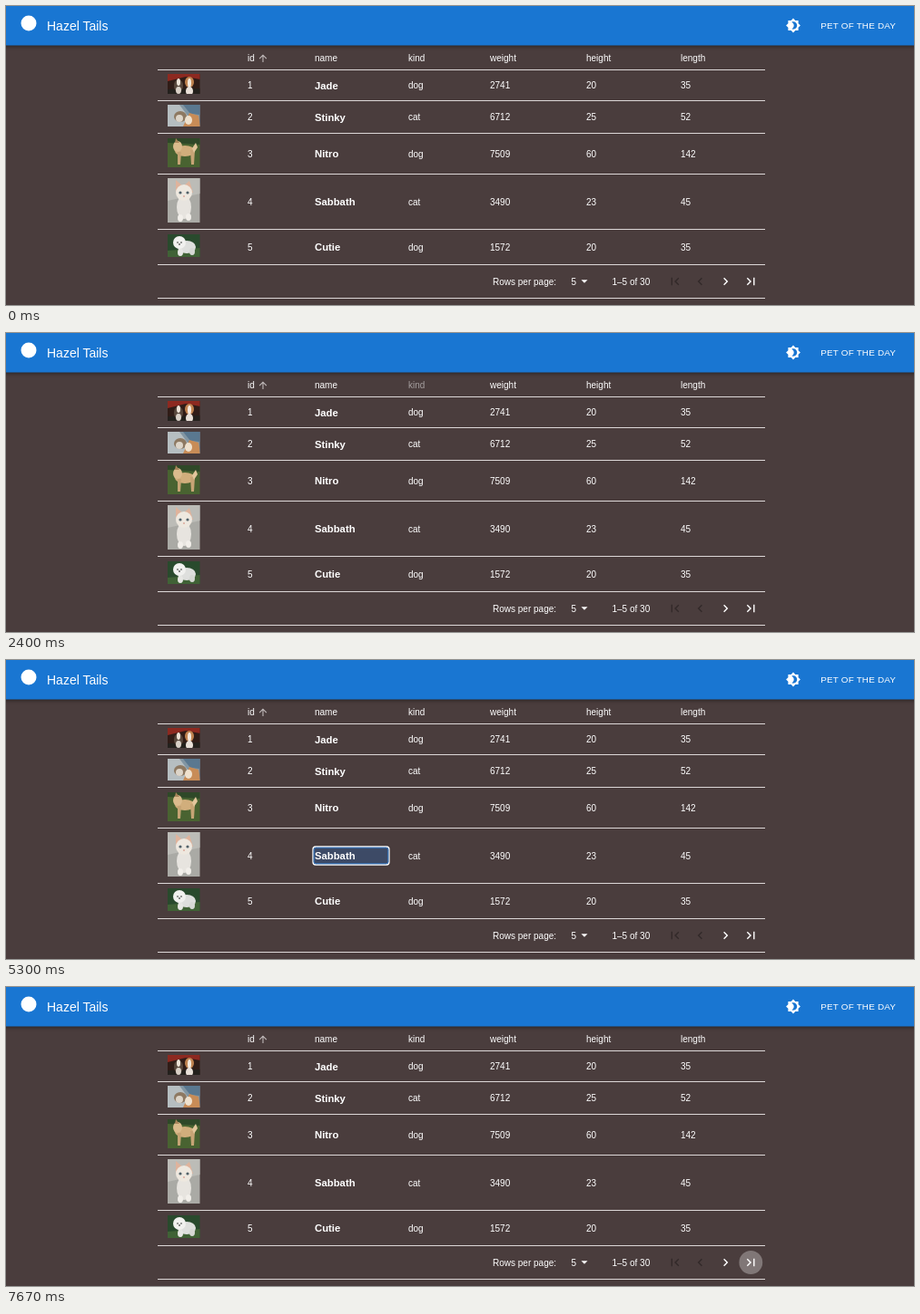
Write an HTML page that moves like this. It is 1000 by 330 pixels and loops after 7.83 s.

```html
<!DOCTYPE html>
<html lang="en">
<head>
<meta charset="utf-8">
<title>Pet table</title>
<style>
  html, body { margin: 0; width: 100%; height: 100%; overflow: hidden; background: #4a3d3d; }
  svg { display: block; }
  text { font: 10px "Liberation Sans", Arial, sans-serif; fill: #fff; white-space: pre; }
  .title { font-size: 14px; }
  .button { font-size: 9.9px; letter-spacing: .2px; }
  .name { font-size: 11.3px; font-weight: bold; }
  .ripple { fill: #fff; }
  .bar { fill: #1976d2; filter: drop-shadow(0 1.5px 2px #0007); }
</style>
</head>
<body>
<svg id="stage" width="1000" height="330" viewBox="0 0 1000 330"></svg>
<script>
const LOOP = 7830, LAST_CHANGE = 7500, FADE = 550;

// Keyboard focus moves on at these times: theme, pet of the day, six headers,
// five names, page size, next page, last page.
const stops = [800, 1200, 1700, 2050, 2400, 2800, 3200, 3600,
  4100, 4400, 4900, 5200, 5500, 5700, 5900, 6500];

const columns = { id: 266, name: 340, kind: 443, weight: 533, height: 639, length: 743 };
const pets = [
  { y: 87.5, id: 1, name: 'Jade', kind: 'dog', weight: 2741, height: 20, length: 35 },
  { y: 122.5, id: 2, name: 'Stinky', kind: 'cat', weight: 6712, height: 25, length: 52 },
  { y: 163, id: 3, name: 'Nitro', kind: 'dog', weight: 7509, height: 60, length: 142 },
  { y: 216, id: 4, name: 'Sabbath', kind: 'cat', weight: 3490, height: 23, length: 45 },
  { y: 266, id: 5, name: 'Cutie', kind: 'dog', weight: 1572, height: 20, length: 35 }
];

const text = (x, y, s, attrs = '') => `<text x="${x}" y="${y}" ${attrs}>${s}</text>`;
const path = (d, fill) => `<path d="${d}" fill="${fill}"/>`;
const oval = (x, y, rx, ry, fill) => `<ellipse cx="${x}" cy="${y}" rx="${rx}" ry="${ry}" fill="${fill}"/>`;
const photo = (y, h, back, shapes) =>
  `<svg x="178" y="${y}" width="35.5" height="${h}"><rect width="36" height="${h}" fill="${back}"/>${shapes}</svg>`;
const icon = (x, y, size, d, fill = '#fff') =>
  `<path transform="translate(${x - size / 2} ${y - size / 2}) scale(${size / 24})" d="${d}" fill="${fill}"/>`;
const ripple = (stop, x, y, r, attrs = '') =>
  `<circle class="ripple" data-stop="${stop}" data-r="${r}" cx="${x}" cy="${y}" ${attrs}/>`;

const photos = [
  photo(75, 22, '#301c17',
    path('M0 0H36V6L20 3L0 8Z', '#8d2920') + path('M0 17L36 16V22H0Z', '#24211d') +
    oval(12, 13, 5, 7, '#59483d') + oval(12, 9, 2, 4, '#eee3d8') + oval(12, 18, 3, 4, '#d9d0c7') +
    oval(24, 9, 5, 6, '#c18350') + oval(24, 10, 2, 5, '#f5eadf') + oval(24, 19, 4, 5, '#e9e0d8')),
  photo(109, 24, '#8296a3',
    path('M0 0H13L31 24H0Z', '#b6bec1') + path('M17 0H36V11L25 10Z', '#5a7890') +
    oval(14, 13, 7, 6, '#8e7962') + oval(13, 15, 4, 4, '#ddd5c9') +
    path('M17 24L24 9L34 12L36 24Z', '#c88c57') + oval(23, 17, 4, 5, '#efe1ce')),
  photo(146, 32, '#496331',
    path('M0 0H36V7L0 5Z', '#2f4828') + oval(19, 14, 11, 6, '#d1ae7c') + oval(11, 9, 5, 6, '#dbbb8d') +
    path('M11 15H15L14 29H11ZM25 13H30L29 29H26Z', '#c6a475') + path('M27 11L31 5L33 10L29 16Z', '#e2c69c') +
    path('M8 5L9 0L13 5Z', '#a8845a')),
  photo(190, 49, '#aaaaa5',
    path('M0 0H36V17L0 25Z', '#bcbcb7') + oval(18, 32, 8, 13, '#e7e4df') +
    path('M9 15L9 2L17 9L24 3L28 16Z', '#dfb39c') + oval(18, 16, 9, 9, '#eee8df') +
    oval(14, 16, 1.6, 1.6, '#52626a') + oval(22, 16, 1.6, 1.6, '#52626a') + oval(18, 20, 1.2, .8, '#d89b8d') +
    oval(14, 44, 3, 4, '#f2efea') + oval(23, 43, 3, 4, '#f2efea')),
  photo(252, 25, '#294a2d',
    path('M0 18L36 15V25H0Z', '#406236') + oval(21, 14, 10, 7, '#dedfdd') + oval(13, 9, 7, 7, '#f1f1ef') +
    oval(14, 20, 3, 4, '#e8e8e5') + oval(27, 19, 3, 4, '#d6d8d4') +
    oval(11, 9, .8, .8, '#282b29') + oval(15, 9, .8, .8, '#282b29') + oval(13, 11, 1, .8, '#282b29'))
];

const header = Object.entries(columns).map(([label, x], i) =>
  text(x, 61, label, i ? `data-stop="${i + 2}" class="label"` : '')).join('');

const rows = pets.map((pet, i) => photos[i] +
  `<g class="ring" data-stop="${i + 8}">
    <rect x="338" y="${pet.y - 10}" width="84" height="20" rx="3" fill="#3d4a66" stroke="#fff" stroke-width="1.3"/>
    <rect x="339.2" y="${pet.y - 8.8}" width="81.6" height="17.6" rx="2" fill="none" stroke="#3478c4"/>
  </g>` +
  Object.entries(columns).map(([key, x]) => key === 'name'
    ? text(x, pet.y + 4, pet.name, 'class="name"')
    : text(x, pet.y + 3.5, pet[key])).join('')).join('');

const lines = [70.5, 104.5, 140.5, 185.5, 246.5, 285.5, 322.5].map(y => `M167 ${y}H836`).join('');
const dim = '#322929';

document.getElementById('stage').innerHTML = `
  <clipPath id="petButton"><rect x="892" y="9" width="95" height="25.5" rx="3"/></clipPath>
  <rect width="1000" height="330" fill="#4a3d3d"/>
  <rect class="bar" x="-10" y="-10" width="1020" height="53.5"/>
  <circle cx="25" cy="19" r="8.5" fill="#fff"/>
  ${text(45, 26.5, 'Hazel Tails', 'class="title"')}
  ${ripple(0, 867, 21.5, 14)}
  ${icon(867, 21.5, 16.8, 'M20 8.69V4h-4.69L12 .69 8.69 4H4v4.69L.69 12 4 15.31V20h4.69L12 23.31 15.31 20H20v-4.69L23.31 12zM12 18c-.89 0-1.74-.2-2.5-.55C11.56 16.5 13 14.42 13 12s-1.44-4.5-3.5-5.45C10.26 6.2 11.11 6 12 6c3.31 0 6 2.69 6 6s-2.69 6-6 6z')}
  ${ripple(1, 939.5, 21.5, 39.5, 'clip-path="url(#petButton)"')}
  ${text(897.2, 25, 'PET OF THE DAY', 'class="button"')}
  <path d="${lines}" stroke="#ddd8d8"/>
  ${header}
  ${icon(283, 57.8, 12.7, 'M4 12l1.41 1.41L11 7.83V20h2V7.83l5.58 5.59L20 12l-8-8z', '#c4bdbd')}
  ${rows}
  ${text(536, 307.5, 'Rows per page:')}
  <rect class="ring" data-stop="13" x="617" y="293" width="28" height="22" rx="2" fill="#000" fill-opacity=".05"/>
  ${text(622.5, 307.5, '5')}
  ${icon(637, 303.7, 16.8, 'M7 10l5 5 5-5z')}
  ${text(667.5, 307.5, '1–5 of 30')}
  ${ripple(14, 792.5, 304, 13.7)}
  ${ripple(15, 820.3, 304, 13.7)}
  ${icon(736.8, 304, 16.8, 'M18.41 16.59L13.82 12l4.59-4.59L17 6l-6 6 6 6zM6 6h2v12H6z', dim)}
  ${icon(764.5, 304, 16.8, 'M15.41 16.59L10.83 12l4.58-4.59L14 6l-6 6 6 6z', dim)}
  ${icon(792.5, 304, 16.8, 'M8.59 16.59L13.17 12 8.59 7.41 10 6l6 6-6 6z')}
  ${icon(820.3, 304, 16.8, 'M5.59 7.41L10.18 12l-4.59 4.59L7 18l6-6-6-6zM16 6h2v12h-2z')}`;

const clamp = u => Math.max(0, Math.min(1, u));
const ease = u => 1 - (1 - u) ** 3;

function drawRipple(el, t, start, end) {
  const grow = ease(clamp((t - start) / FADE));
  const fade = 1 - ease(clamp((t - end) / FADE));
  const beat = Math.max(0, t - start - 200) / 2500;
  const pulse = 1 - .04 * (1 - Math.cos(2 * Math.PI * beat));
  el.setAttribute('r', el.dataset.r * grow * pulse);
  el.setAttribute('opacity', t < start ? 0 : (.1 + .2 * grow) * fade);
}

const targets = [...document.querySelectorAll('[data-stop]')];

function render(now) {
  const t = Math.min(LAST_CHANGE, Math.floor(now % LOOP / 100) * 100);
  for (const el of targets) {
    const i = +el.dataset.stop, start = stops[i], end = stops[i + 1] ?? LOOP;
    const focused = t >= start && t < end;
    if (el.matches('.ripple')) drawRipple(el, t, start, end);
    else if (el.matches('.label')) el.setAttribute('opacity', focused ? .5 : 1);
    else el.setAttribute('visibility', focused ? 'visible' : 'hidden');
  }
}

const begin = performance.now();
(function tick() {
  render(performance.now() - begin);
  requestAnimationFrame(tick);
})();
</script>
</body>
</html>
```
